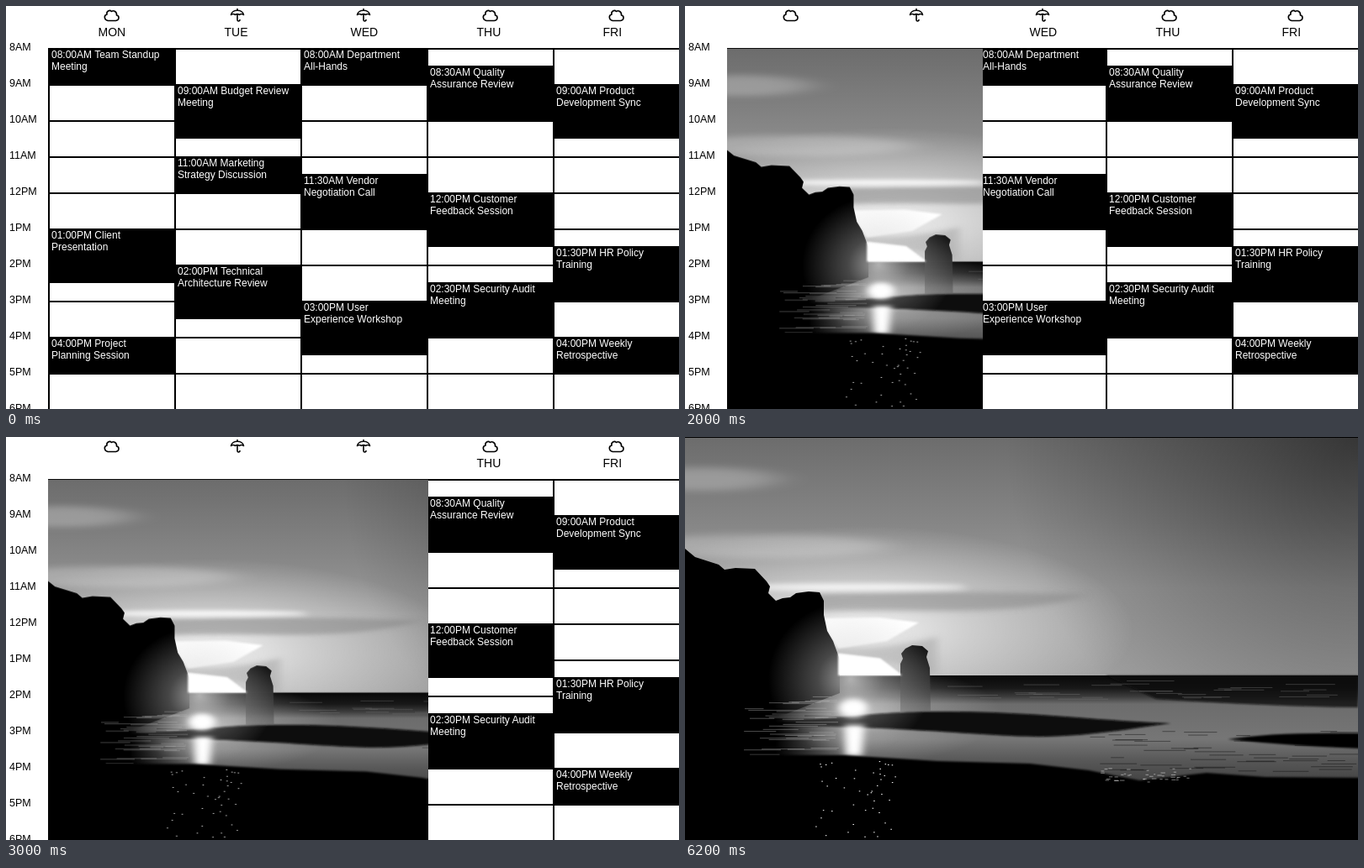
These frames come from a looping animation (800x480 px, 7 s). An HTML page:

```html
<!DOCTYPE html>
<html lang="en">
<head>
<meta charset="utf-8">
<title>Week planner</title>
<style>
  html, body { margin: 0; width: 100%; height: 100%; overflow: hidden; background: #fff; }
  svg { display: block; width: 100vw; height: 100vh; }
  text { font: 12px "Liberation Sans", Arial, sans-serif; }
  #hours text { font-size: 12.5px; }
  #days text { font-size: 14px; }
  #events text { fill: #fff; }
  #icons { fill: none; stroke: #000; stroke-width: 1.6; stroke-linejoin: round; }
  #grid, #events rect { shape-rendering: crispEdges; }
</style>
</head>
<body>
<svg viewBox="0 0 800 480">
  <defs>
    <clipPath id="window"><rect id="pane" x="50" y="50" width="0" height="430"/></clipPath>
    <filter id="soft1" x="-20%" y="-50%" width="140%" height="200%"><feGaussianBlur stdDeviation="1.2"/></filter>
    <filter id="soft4" x="-30%" y="-100%" width="160%" height="300%"><feGaussianBlur stdDeviation="5 3"/></filter>
    <filter id="soft9" x="-50%" y="-100%" width="200%" height="300%"><feGaussianBlur stdDeviation="22 4"/></filter>
    <linearGradient id="sky" x2="0" y2="1">
      <stop stop-color="#6c6c6c"/><stop offset=".35" stop-color="#858585"/>
      <stop offset=".63" stop-color="#9c9c9c"/><stop offset="1" stop-color="#a0a0a0"/>
    </linearGradient>
    <radialGradient id="dusk" gradientUnits="userSpaceOnUse" cx="800" cy="0" r="420">
      <stop stop-opacity=".5"/><stop offset="1" stop-opacity="0"/>
    </radialGradient>
    <radialGradient id="glow">
      <stop stop-color="#fff" stop-opacity=".9"/><stop offset=".4" stop-color="#fff" stop-opacity=".5"/>
      <stop offset="1" stop-color="#fff" stop-opacity="0"/>
    </radialGradient>
    <radialGradient id="haze">
      <stop stop-color="#ddd" stop-opacity=".75"/><stop offset=".4" stop-color="#ccc" stop-opacity=".35"/>
      <stop offset="1" stop-color="#ccc" stop-opacity="0"/>
    </radialGradient>
    <linearGradient id="sea" gradientUnits="userSpaceOnUse" x1="0" y1="284" x2="0" y2="410">
      <stop stop-color="#080808"/><stop offset=".12" stop-color="#181818"/>
      <stop offset=".2" stop-color="#3c3c3c"/><stop offset=".27" stop-color="#6c6c6c"/>
      <stop offset=".6" stop-color="#767676"/><stop offset=".8" stop-color="#585858"/>
      <stop offset="1" stop-color="#444"/>
    </linearGradient>
    <linearGradient id="shade">
      <stop/><stop offset=".55"/><stop offset="1" stop-opacity="0"/>
    </linearGradient>
    <linearGradient id="rock" x2="0" y2="1">
      <stop stop-color="#101010"/><stop offset=".45" stop-color="#303030"/><stop offset="1" stop-color="#606060" stop-opacity=".5"/>
    </linearGradient>
  </defs>

  <g id="icons"></g>
  <g id="hours"></g>
  <g id="days"></g>
  <g id="grid"></g>
  <g id="events"></g>

  <g id="view"><g id="photo">
    <rect width="800" height="285" fill="url(#sky)"/>
    <rect width="800" height="285" fill="url(#dusk)"/>
    <g fill="#fff" filter="url(#soft9)">
      <ellipse cx="20" cy="50" rx="90" ry="14" opacity=".25"/>
      <ellipse cx="90" cy="130" rx="150" ry="14" opacity=".25"/>
    </g>
    <ellipse cx="205" cy="230" rx="330" ry="125" fill="url(#glow)"/>
    <g filter="url(#soft4)">
      <ellipse cx="200" cy="179" rx="135" ry="4" fill="#fff" opacity=".85"/>
      <path d="M150 187Q300 181 480 188Q420 208 300 207T160 208Z" fill="#888" opacity=".55"/>
      <path d="M165 250Q220 258 300 238V284Q240 262 165 262Z" fill="#aaa" opacity=".6"/>
    </g>
    <path d="M160 216L230 215 278 221 240 243 182 252ZM182 258L232 264 258 284H182Z" fill="#fff" filter="url(#soft1)"/>

    <rect y="284" width="800" height="196" fill="url(#sea)"/>
    <path d="M500 284H800V322Q700 321 560 312Z" fill="#0a0a0a" opacity=".8" filter="url(#soft1)"/>
    <ellipse cx="205" cy="330" rx="170" ry="60" fill="url(#haze)"/>
    <g filter="url(#soft1)">
      <path d="M60 343C180 336 220 327 300 327C400 326 480 337 578 341C530 347 480 357 420 357C350 356 260 344 60 343Z" fill="#080808"/>
      <path d="M645 360Q700 351 802 353V371Q720 368 645 360Z"/>
    </g>

    <path d="M0 133L12 143 40 152 47 158 60 156 83 157 97 172 101 178 99 186 108 195 116 192 125 191 132 186 147 184 160 185 165 195 165 212 169 231 176 243 184 265V305L120 330 0 345Z"/>
    <rect y="290" width="195" height="100" fill="url(#shade)"/>
    <path d="M257 258L262 252 270 248 282 249 289 255 287 262 291 275 292 327H256V270L259 264Z" fill="url(#rock)"/>
    <ellipse cx="197" cy="288" rx="98" ry="92" fill="url(#haze)"/>
    <path d="M182 258L232 264 258 284H182Z" fill="#fff" filter="url(#soft1)"/>

    <g fill="#fff" filter="url(#soft4)">
      <ellipse cx="200" cy="323" rx="17" ry="11"/>
      <path d="M190 343H213L210 380H191Z"/>
    </g>
    <g id="streaks"></g>
    <path d="M-20 379H190L300 386 410 389 480 397 540 409 620 400 690 405 820 406V500H-20Z" filter="url(#soft1)"/>
    <g id="sparks" fill="#fff"></g>
    <rect width="800" height="1"/>
  </g></g>
</svg>

<script>
const $ = id => document.getElementById(id);
const COL = 150, ROW = 43, LEFT = 50, TOP = 50;
const range = n => [...Array(n).keys()];
const rect = (x, y, w, h, extra = "") => `<rect x="${x}" y="${y}" width="${w}" height="${h}" ${extra}/>`;
const label = (x, y, s) => `<text x="${x}" y="${y}">${s}</text>`;

const days = ["MON", "TUE", "WED", "THU", "FRI"];
// day, start hour, length in hours, two lines of text
const events = [
  [0, 8, 1, "Team Standup", "Meeting"],
  [0, 13, 1.5, "Client", "Presentation"],
  [0, 16, 1, "Project", "Planning Session"],
  [1, 9, 1.5, "Budget Review", "Meeting"],
  [1, 11, 1, "Marketing", "Strategy Discussion"],
  [1, 14, 1.5, "Technical", "Architecture Review"],
  [2, 8, 1, "Department", "All-Hands"],
  [2, 11.5, 1.5, "Vendor", "Negotiation Call"],
  [2, 15, 1.5, "User", "Experience Workshop"],
  [3, 8.5, 1.5, "Quality", "Assurance Review"],
  [3, 12, 1.5, "Customer", "Feedback Session"],
  [3, 14.5, 1.5, "Security Audit", "Meeting"],
  [4, 9, 1.5, "Product", "Development Sync"],
  [4, 13.5, 1.5, "HR Policy", "Training"],
  [4, 16, 1, "Weekly", "Retrospective"],
];

const hour12 = h => Math.floor((h + 11) % 12) + 1;
const half = h => h < 12 ? "AM" : "PM";
const clock = h => `${String(hour12(h)).padStart(2, "0")}:${h % 1 ? "30" : "00"}${half(h)}`;

const cloud = "M5 15.5H14.5C19 15 19 9.500 15.500 9C16 5 12 2.500 9.500 4.500C7 2 3 4.500 4 8C0 9 .5 14.500 5 15.500Z";
const umbrella = "M1.500 8.500C2.500 1.500 15.500 1.500 16.500 8.500Q14 6.500 11.500 8.500Q9 6.500 6.500 8.500Q4 6.500 1.500 8.500ZM9 1V3M9 8V14.500Q9 16 10.500 16T12 14";

$("icons").innerHTML = days.map((_, i) =>
  `<path transform="translate(${116 + i * COL} 2)" d="${i == 1 || i == 2 ? umbrella : cloud}"/>`).join("");
$("days").innerHTML = days.map((d, i) => label(109.5 + i * COL, 36, d)).join("");
$("hours").innerHTML = range(11).map(i => label(4, 52.500 + i * ROW, hour12(8 + i) + half(8 + i))).join("");
$("grid").innerHTML =
  range(10).map(i => rect(LEFT, TOP + i * ROW, 750, 2)).join("") +
  range(5).map(i => rect(LEFT + i * COL, TOP, 2, 430)).join("");
$("events").innerHTML = events.map(([d, start, len, a, b]) => {
  const x = LEFT + d * COL, y = Math.floor(TOP + (start - 8) * ROW);
  return rect(x, y, COL, Math.floor(len * ROW) + 1) +
    label(x + 4, y + 12, `${clock(start)} ${a}`) + label(x + 4, y + 26, b);
}).join("");

let seed = 7;
const rnd = (a, b) => a + (b - a) * ((seed = seed * 16807 % 2147483647) / 2147483647);
const streak = (x, y, w, fill) => rect(x, y, w, 1, `fill="${fill}" opacity=".4"`);
$("streaks").innerHTML =
  range(36).map(() => { const x = rnd(70, 160); return streak(x, rnd(305, 378), rnd(15, 185 - x), "#bbb"); }).join("") +
  range(30).map(() => streak(rnd(300, 760), rnd(290, 312), rnd(20, 60), "#777")).join("") +
  range(50).map(() => streak(rnd(470, 780), rnd(350, 400), rnd(15, 50), "#000")).join("");
$("sparks").innerHTML =
  range(45).map(() => rect(rnd(155, 250), rnd(385, 479), 1.500, 1)).join("") +
  range(40).map(() => rect(rnd(480, 600), rnd(394, 411), rnd(2, 6), 1, 'opacity=".45"')).join("");

function draw(t) {
  const step = Math.min(5, Math.floor(t / 1000));
  const full = step == 5;
  $("view").style.display = step ? "" : "none";
  $("pane").setAttribute("width", step * 148 + 8);
  full ? $("view").removeAttribute("clip-path") : $("view").setAttribute("clip-path", "url(#window)");
  $("photo").setAttribute("transform", full ? "" : "translate(47 50) scale(.93 .8958)");
  [...$("days").children].forEach((d, i) => d.style.display = i < step ? "none" : "");
}

const begin = performance.now();
function tick() {
  draw((performance.now() - begin) % 7000);
  requestAnimationFrame(tick);
}
tick();
</script>
</body>
</html>
```
